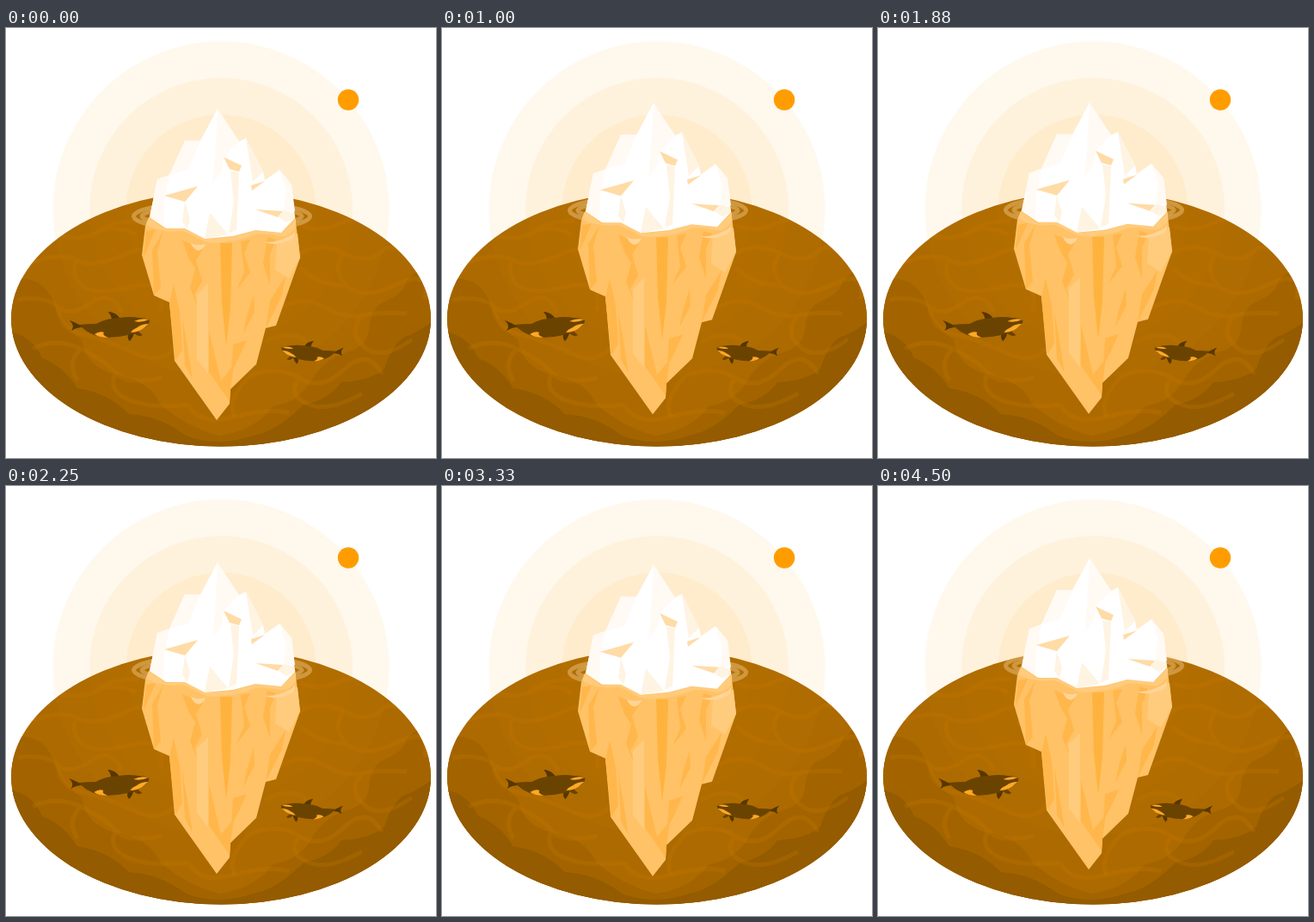
An HTML page that plays this animation: 500x500 px, repeating every 4540 ms.

```html
<!DOCTYPE html>
<html lang="en">
<head>
<meta charset="utf-8">
<title>Iceberg</title>
<style>
  html, body { margin: 0; height: 100%; overflow: hidden; background: #fff; }
  svg { display: block; width: 100%; height: 100%; }
</style>
</head>
<body>
<svg viewBox="0 0 500 500">
  <defs>
    <clipPath id="sea"><ellipse cx="250" cy="338" rx="244" ry="148.5"/></clipPath>
    <g id="halo">
      <circle cx="250" cy="211" r="195.5"/>
      <circle cx="250" cy="211" r="153"/>
      <circle cx="250" cy="211" r="110.5"/>
    </g>
    <g id="orca">
      <path fill="#6b4300" d="M74 340Q80 342 85 345Q95 344 105 344Q114 339 123 338Q122 333 119 330Q128 331 132 337Q144 335 155 337Q164 337 167 340Q167 344 163 347Q159 350 154 353L159 357Q154 360 149 355Q147 361 144 364Q141 361 142 357Q130 360 118 360Q100 359 88 348Q82 348 76 352Q81 346 74 340Z"/>
      <path fill="#573700" d="M119 330Q128 331 132 337L123 338Q122 333 119 330ZM74 340L85 345L88 348Q82 348 76 352Q81 346 74 340ZM142 357L149 355Q147 361 144 364Q141 361 142 357Z"/>
      <path fill="#ffa826" d="M103 356Q109 352 114 354Q111 357 119 360Q108 360 103 356ZM166 344Q158 344 153 348Q148 350 145 354Q153 354 159 350ZM149 341Q157 337 166 339Q158 343 149 341Z"/>
    </g>
  </defs>

  <use href="#halo" fill="#ff9d00" fill-opacity=".072"/>
  <circle cx="398" cy="83.5" r="12.2" fill="#ff9d00"/>

  <g clip-path="url(#sea)">
    <path fill="#ad6a00" d="M0 180H500V490H0Z"/>
    <use href="#halo" fill="#ff9d00" fill-opacity=".025"/>
    <path fill="#a36400" d="M0 292Q42 285 55 318Q64 348 88 362Q93 395 128 403Q165 408 180 438Q210 464 248 474Q290 468 310 440Q342 434 355 410Q368 387 393 378Q420 372 422 350Q424 325 440 318Q464 308 466 294Q478 280 500 275V500H0Z"/>
    <path fill="#945b00" d="M0 352Q31 357 42 384Q67 393 83 419Q119 424 143 449Q180 451 209 474Q247 488 287 474Q315 469 346 438Q376 432 390 412Q425 410 440 396Q448 370 462 360Q480 354 500 338V500H0Z"/>
    <g fill="none" stroke="#c77b00" stroke-opacity=".24" stroke-width="5" stroke-linejoin="round">
      <path d="M52 239Q85 249 105 238T151 240M28 273Q64 260 83 270T139 263T163 278M82 270Q74 286 88 299T145 301T180 329M13 316Q46 311 60 324T98 320T135 331M105 238Q119 225 155 224M60 324Q62 350 89 356T147 377T195 373M31 373Q58 359 87 373T128 401T181 407M128 401Q117 421 142 432T212 438M87 373Q70 388 83 410M212 438Q225 463 266 452T329 448"/>
      <path d="M342 229Q364 239 389 227T438 239M340 263Q365 248 393 262T437 260T482 282M393 262Q378 283 397 300T455 298T487 315M342 279Q359 298 397 300M318 326Q346 310 369 324T414 334T466 332M414 334Q397 354 417 371T472 362M301 365Q332 349 350 365M283 405Q316 391 341 407T393 397T437 402M341 407Q326 426 350 437T414 425M266 452Q256 433 283 405"/>
    </g>
  </g>

  <g id="orcas">
    <use href="#orca"/>
    <use href="#orca" transform="translate(392 364) scale(-.78 .78) translate(-75 -330)"/>
  </g>

  <g id="berg">
    <g fill="none" stroke="#ffe0b0" stroke-opacity=".36" stroke-width="5">
      <ellipse cx="251" cy="219" rx="102.5" ry="17"/>
      <ellipse cx="251" cy="219" rx="93" ry="12"/>
    </g>

    <path fill="#ffc266" d="M167 219L336 218L342 267L314 346L302 349L291 391L261 420L260 437L245 456L196 387L190 319L172 311L158 264L162 230Z"/>
    <path fill="#ffb74c" d="M163 236L174 234L162 262L160 266ZM183 236L176 260L180 302L172 311L170 258ZM205 247L229 257L221 270L228 294L219 310L225 329L214 302L220 280L212 267ZM190 320L195 298L202 330L205 374L197 387ZM273 248L284 246L277 262L284 284L268 305L277 284ZM304 243L314 246L307 263L307 299L299 274ZM325 289L321 311L302 349L307 317ZM288 310L289 330L276 355L280 335ZM236 352L250 410L265 392L261 420L260 434L236 400ZM205 337L209 359L217 408L208 392ZM264 368L280 363L270 385L262 400Z"/>
    <path fill="#ffb33f" d="M249 250L263 250L261 325L256 369L251 320Z"/>
    <path fill="#ffcb7d" d="M315 248L339 239L342 267L329 291L313 281ZM222 310L235 297V402L222 385Z"/>
    <path fill="#ffcb7d" d="M166 220L185 234L208 232L231 245L264 243L290 235L320 238L337 222L337 232Q328 244 318 242Q302 238 290 240Q272 248 258 248Q242 252 230 248Q216 240 205 236Q191 238 181 235Q170 234 163 228Z"/>
    <path fill="#ffd597" d="M215 250Q222 254 232 251Q230 257 224 259Q217 257 215 250ZM301 249Q318 249 327 243Q334 241 336 236Q337 246 327 248Q314 254 301 249Z"/>

    <path fill="#fff" d="M246 94L271 132L279 128L299 167L301 177L318 165L332 182L336 221L320 238L290 235L264 242L231 245L208 233L186 233L167 220L176 176L190 171L208 131L226 131Z"/>
    <path fill="#fffaf4" d="M208 131L226 131L212 165L190 171ZM246 94L271 132L253 150L251 166L240 181L243 152ZM176 176L190 171L184 200L183 230L167 220ZM318 165L332 182L336 213L323 212L326 190Z"/>
    <path fill="#fff3e2" d="M279 128L299 167L287 179ZM208 202L214 222L211 233L205 225ZM261 166L271 168L268 235L259 239L265 202ZM237 215L258 240L231 245ZM317 220L323 212L335 215L336 221L326 226Z"/>
    <path fill="#ffdba6" d="M184 195L223 184L208 202ZM253 150L274 160L271 167L260 164ZM285 183L301 178L286 189ZM290 211L322 213L316 220Z"/>
  </g>
</svg>
<script>
  const LOOP = 4540, CYCLE = 3000, SHUTTER = 15;
  const sway = [0, -1, 2, -4, 4, -4, 4, -4, 2, -1, 0];
  const berg = document.getElementById('berg');
  const orcas = document.getElementById('orcas');

  function draw(now) {
    const u = (now % LOOP + SHUTTER) % CYCLE / CYCLE;
    const rise = 10 * (1 - Math.abs(1 - 2 * u));
    const i = Math.floor(u * 10);
    const shift = sway[i] + (sway[i + 1] - sway[i]) * (u * 10 - i);
    berg.setAttribute('transform', `translate(0 ${-rise})`);
    orcas.setAttribute('transform', `translate(${shift} 0)`);
  }

  const start = performance.now();
  function tick() {
    draw(performance.now() - start);
    requestAnimationFrame(tick);
  }
  tick();
</script>
</body>
</html>
```
